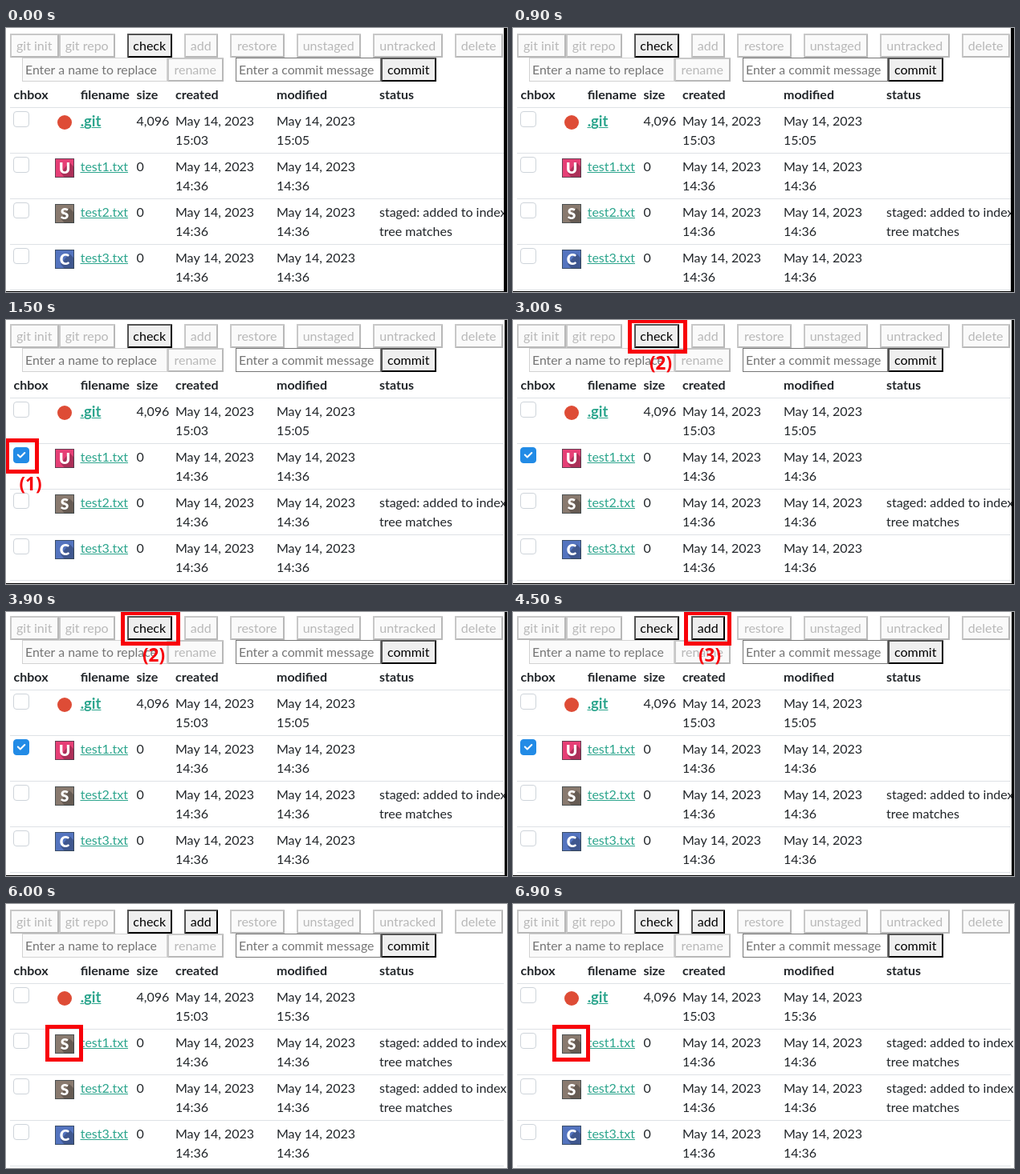
Animation, 624 px wide and 330 px high, one loop 7.5 s. Source, as an HTML page with a canvas:

```html
<!DOCTYPE html>
<html lang="en">
<head>
<meta charset="utf-8">
<title>Staging a file</title>
<style>
html, body { margin: 0; width: 100%; height: 100%; overflow: hidden; background: #fff; }
canvas { display: block; width: 624px; height: 330px; }
</style>
</head>
<body>
<canvas id="stage" width="624" height="330"></canvas>
<script>
const ctx = document.getElementById('stage').getContext('2d');
const STEP = 1500;
const INK = '#212529';
const RED = '#f80009';
const COLS = { name: 92.7, size: 162.5, created: 211, modified: 337, status: 465 };
const BADGES = { U: '#e63f76', S: '#897a6f', C: '#5474bf' };

// label, left, right, line
const BUTTONS = [
  ['git init', 5, 66, 0], ['git repo', 66, 136, 0], ['check', 151, 207, 0],
  ['add', 222, 264, 0], ['restore', 279, 347, 0], ['unstaged', 362, 442, 0],
  ['untracked', 457, 544, 0], ['delete', 559, 619, 0],
  ['rename', 201, 271, 1], ['commit', 467, 536, 1]
];

// top offset, left side of the black edge, highlight box [left, top, right, bottom], label [text, x, baseline]
const SCENES = [
  { top: 2, edge: 620 },
  { top: 0, edge: 621, checked: true, box: [-1, 148, 41, 192], label: ['(1)', 30.5, 213] },
  { top: 0, edge: 621, checked: true, box: [143, -1, 217, 42], label: ['(2)', 184, 62] },
  { top: 0, edge: 621, checked: true, box: [213, -1, 272, 42], label: ['(3)', 245, 62], add: true },
  { top: 2, staged: true, box: [49, 151, 96, 197], add: true }
];

function rect(x, y, w, h, color) {
  ctx.fillStyle = color;
  ctx.fillRect(x, y, w, h);
}

function text(str, x, y, color = INK, font = '16px Lato, sans-serif', align = 'left') {
  ctx.font = font;
  ctx.fillStyle = color;
  ctx.textAlign = align;
  ctx.fillText(str, x, y);
}

function bevel(x, y, w, h, light, dark) {
  rect(x, y, w, 2, light);
  rect(x, y, 2, h, light);
  rect(x + 1, y + h - 1, w - 1, 1, dark);
  rect(x + 2, y + h - 2, w - 2, 1, dark);
  rect(x + w - 1, y + 1, 1, h - 1, dark);
  rect(x + w - 2, y + 2, 1, h - 2, dark);
}

function button([label, left, right, line], on) {
  const y = 5 + line * 30;
  const w = right - left;
  rect(left, y, w, 30, on ? '#efefef' : '#fafafa');
  bevel(left, y, w, 30, on ? '#545454' : '#c8c8c8', on ? '#000' : '#b8b8b8');
  text(label, (left + right) / 2 - 0.3, y + 21, on ? '#000' : '#b8b8b8', undefined, 'center');
}

function input(x, hint, on) {
  rect(x, 35, 181, 30, on ? '#fff' : '#fafafa');
  ctx.strokeStyle = on ? '#767676' : '#d2d2d2';
  ctx.lineWidth = 1;
  ctx.strokeRect(x + 0.5, 35.5, 180, 29);
  text(hint, x + 4, 56, '#757575', '15.8px Lato, sans-serif');
}

function checkbox(y, on) {
  ctx.beginPath();
  ctx.roundRect(9.5, y + 0.5, 19, 19, 3.5);
  ctx.fillStyle = on ? '#228be6' : '#fff';
  ctx.strokeStyle = on ? '#228be6' : '#ced4da';
  ctx.lineWidth = 1;
  ctx.fill();
  ctx.stroke();
  if (!on) return;
  ctx.beginPath();
  ctx.moveTo(14.8, y + 9.5);
  ctx.lineTo(17.8, y + 12.5);
  ctx.lineTo(23.3, y + 7);
  ctx.strokeStyle = '#fff';
  ctx.lineWidth = 2;
  ctx.lineCap = ctx.lineJoin = 'round';
  ctx.stroke();
  ctx.lineCap = 'butt';
  ctx.lineJoin = 'miter';
}

function badge(letter, y) {
  const x = 61;
  rect(x, y, 24, 24, BADGES[letter]);
  ctx.beginPath();
  ctx.moveTo(x + 18, y + 5);
  ctx.lineTo(x + 24, y + 11);
  ctx.lineTo(x + 24, y + 24);
  ctx.lineTo(x + 12, y + 24);
  ctx.lineTo(x + 7, y + 18);
  ctx.fillStyle = 'rgba(0, 0, 0, 0.25)';
  ctx.fill();
  ctx.strokeStyle = 'rgba(50, 65, 70, 0.7)';
  ctx.lineWidth = 1;
  ctx.strokeRect(x + 0.5, y + 0.5, 23, 23);
  text(letter, x + 12, y + 19, '#fff', '900 19px Lato, sans-serif', 'center');
}

function link(str, y, font) {
  ctx.font = font;
  ctx.textAlign = 'left';
  rect(COLS.name, y + 1, ctx.measureText(str).width, 1, '#2ca58d');
  ctx.strokeStyle = '#fff';
  ctx.lineWidth = 2;
  ctx.strokeText(str, COLS.name, y);
  rect(COLS.name, y + 1, ctx.measureText(str.slice(0, 1)).width, 1, '#2ca58d');
  text(str, COLS.name, y, '#2ca58d', font);
}

function row(i, { name, size = '0', icon, created, modified, checked, staged }) {
  const top = 97 + i * 57;
  const base = top + 23;
  const pair = (a, b, x) => {
    text(a, x, base);
    text(b, x, base + 24);
  };
  checkbox(top + 5, checked);
  if (icon) {
    badge(icon, top + 7);
    link(name, base, '16px Lato, sans-serif');
  } else {
    ctx.beginPath();
    ctx.arc(73, top + 19, 9, 0, Math.PI * 2);
    ctx.fillStyle = '#de4c36';
    ctx.fill();
    link(name, base + 1, 'bold 18.5px Lato, sans-serif');
  }
  text(size, COLS.size, base);
  pair('May 14, 2023', created, COLS.created);
  pair('May 14, 2023', modified, COLS.modified);
  if (staged) pair('staged: added to index', 'tree matches', COLS.status);
  rect(5, top + 57, 615, 1, '#dee2e6');
}

function table(s) {
  const bold = 'bold 16px Lato, sans-serif';
  text('chbox', 9.5, 87, INK, bold);
  text('filename', COLS.name, 87, INK, bold);
  for (const key of ['size', 'created', 'modified', 'status']) text(key, COLS[key], 87, INK, bold);
  rect(5, 97, 615, 1, '#dee2e6');

  const file = { created: '14:36', modified: '14:36' };
  row(0, { name: '.git', size: '4,096', created: '15:03', modified: s.staged ? '15:36' : '15:05' });
  row(1, { ...file, name: 'test1.txt', icon: s.staged ? 'S' : 'U', checked: s.checked, staged: s.staged });
  row(2, { ...file, name: 'test2.txt', icon: 'S', staged: true });
  row(3, { ...file, name: 'test3.txt', icon: 'C' });
}

function draw(s) {
  rect(0, 0, 624, 330, '#fff');
  ctx.save();
  ctx.translate(0, s.top);
  input(20, 'Enter a name to replace', false);
  input(286, 'Enter a commit message', true);
  for (const b of BUTTONS) button(b, b[0] === 'check' || b[0] === 'commit' || (b[0] === 'add' && s.add));
  table(s);
  ctx.restore();

  if (s.box) {
    const [l, t, r, b] = s.box;
    ctx.strokeStyle = RED;
    ctx.lineWidth = 5;
    ctx.strokeRect(l + 2.5, t + 2.5, r - l - 5, b - t - 5);
  }
  if (s.label) text(...s.label, RED, 'bold 22.5px "Open Sans", sans-serif', 'center');
  if (s.edge) {
    rect(s.edge, 0, 624 - s.edge, 330, '#000');
    rect(0, 329, 624, 1, '#000');
  }
}

function tick() {
  draw(SCENES[Math.floor(performance.now() / STEP) % SCENES.length]);
  requestAnimationFrame(tick);
}
tick();
</script>
</body>
</html>
```
